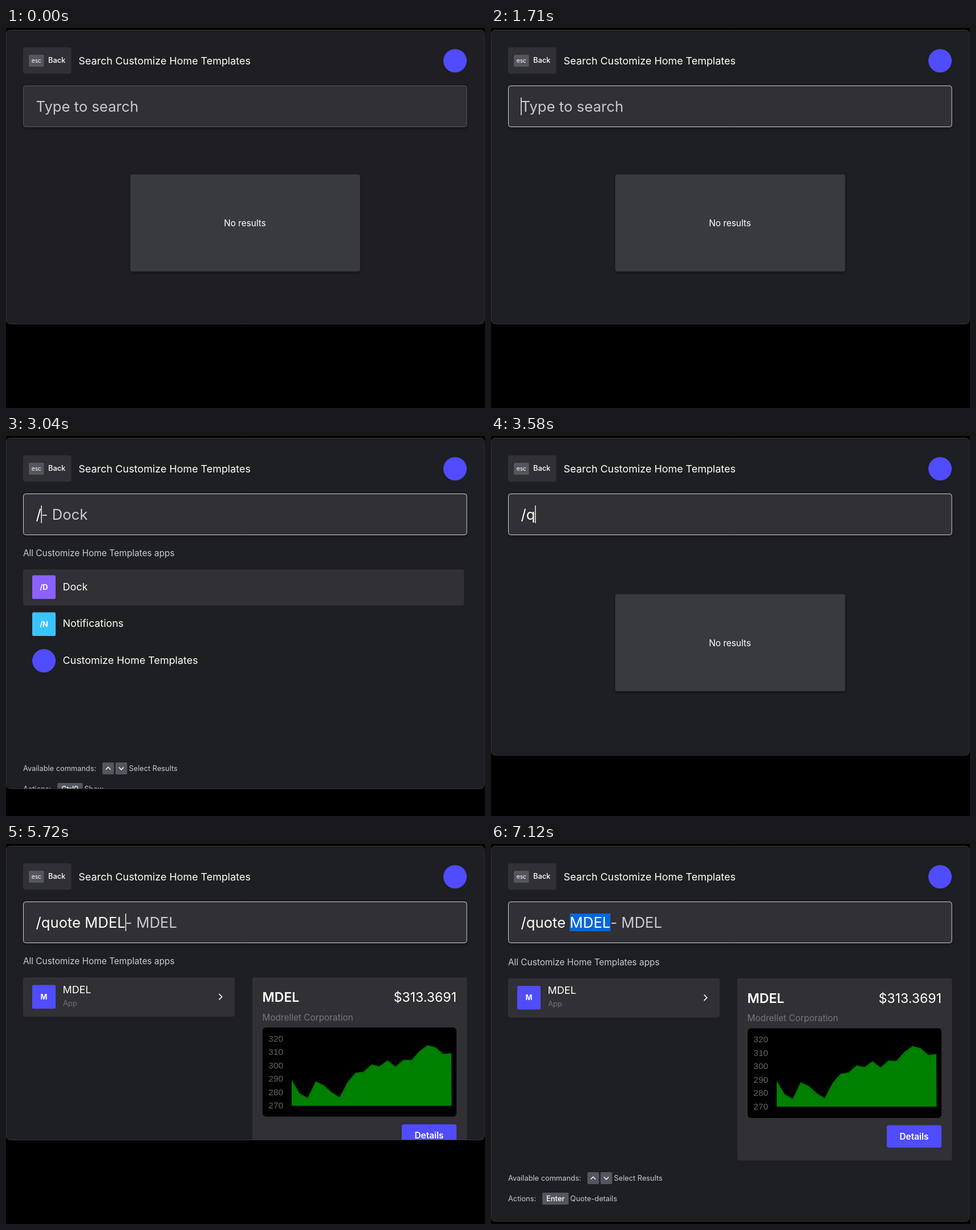
An HTML page with a canvas that plays this animation: 840x667 px, repeating every 8000 ms.

```html
<!DOCTYPE html>
<html lang="en">
<head>
<meta charset="utf-8">
<title>Template search</title>
<style>
html, body { margin: 0; width: 100%; height: 100%; overflow: hidden; background: #000; }
canvas { display: block; width: 840px; height: 667px; }
</style>
</head>
<body>
<canvas id="stage" width="840" height="667"></canvas>
<script>
const ctx = document.getElementById('stage').getContext('2d');
const LOOP = 8000;
const SMALL = 520, TALL = 663;
const TICKER = 'MDEL';
const COMPANY = 'Modrellet Corporation';
const SIZE = { tiny: 10.24, small: 12.8, body: 15.36, item: 17.92, price: 23.04, query: 25.6 };
const C = {
  bg: '#1e1f23', panel: '#303035', card: '#393a3f', key: '#53565f', brand: '#504cff',
  text: '#ffffff', soft: '#c9cbd2', dim: '#75767b', select: '#0866d6'
};

// Each entry holds from its time until the next one.
const TYPED = [[0, ''], [2900, '/'], [3440, '/q'], [3650, '/qu'], [3920, '/quo'], [4000, '/quot'],
  [4270, '/quote'], [4530, '/quote '],
  ...[4930, 5130, 5390, 5650].map((t, i) => [t, '/quote ' + TICKER.slice(0, i + 1)])];
const HEIGHT = [[0, SMALL], [3040, 619.5], [3110, TALL], [3580, 561], [3650, 525], [3720, SMALL],
  [5790, 619.5], [5860, 656], [5930, TALL]];
const VIEW = [[0, 'empty'], [2970, 'apps'], [3510, 'empty'], [5720, 'quote']];
const CARET = [[0, false], [1710, true], [2240, false], [2770, true], [6190, false], [6720, true], [7120, false]];
const PRICES = [46, 22, 14, 43, 36.5, 24, 15, 42, 58, 60, 72.5, 69.5, 80, 69, 81, 80.5, 96, 106.5, 103, 91, 92.5];

const at = (track, t) => track.filter(step => step[0] <= t).pop()[1];

function setFont(size, weight = 400, family = 'Inter') {
  ctx.font = `${weight} ${size}px ${family}, sans-serif`;
}

function label(str, x, y, size, color = C.text, weight = 400, align = 'left', family) {
  setFont(size, weight, family);
  ctx.textAlign = align;
  ctx.fillStyle = color;
  ctx.fillText(str, x, y);
}

function box(x, y, w, h, r, fill, stroke) {
  ctx.beginPath();
  ctx.roundRect(x, y, w, h, r);
  if (fill) {
    ctx.fillStyle = fill;
    ctx.fill();
  }
  if (stroke) {
    ctx.strokeStyle = stroke;
    ctx.lineWidth = 1;
    ctx.stroke();
  }
}

function raised(...args) {
  ctx.save();
  ctx.shadowColor = 'rgba(0,0,0,0.35)';
  ctx.shadowBlur = 5;
  ctx.shadowOffsetY = 3;
  box(...args);
  ctx.restore();
}

function line(points, width) {
  ctx.beginPath();
  points.forEach(p => ctx.lineTo(...p));
  ctx.strokeStyle = C.text;
  ctx.lineWidth = width;
  ctx.stroke();
}

function dot(x, y) {
  ctx.beginPath();
  ctx.arc(x, y, 20.5, 0, Math.PI * 2);
  ctx.fillStyle = C.brand;
  ctx.fill();
}

function badge(str, y, color) {
  box(46, y, 41, 41.5, 2.5, color);
  label(str, 66.5, y + 25.2, SIZE.small, C.text, 700, 'center');
}

function header() {
  box(30, 34, 84.5, 46.5, 4, C.panel);
  box(40, 47, 26.5, 21, 2, C.key);
  label('esc', 53.3, 61, SIZE.tiny, C.text, 400, 'center');
  label('Back', 74, 61.3, SIZE.small, C.text, 500);
  label('Search Customize Home Templates', 127.3, 64, SIZE.item);
  dot(787.5, 57.5);
}

function searchBar(t, typed, view) {
  const focused = t >= 1710, left = 52.5, base = 147;
  raised(30.5, 101.5, 777.5, 72, 4, C.panel);
  box(30.5, 101.5, 777.5, 72, 4, null, focused ? '#cfd0d4' : '#55565b');
  setFont(SIZE.query);
  const end = left + ctx.measureText(typed).width;
  if (t >= 7120) {
    const start = left + ctx.measureText('/quote ').width;
    ctx.fillStyle = C.select;
    ctx.fillRect(start, 122, end - start, 31);
  }
  if (!typed) label('Type to search', left, base, SIZE.query, C.soft);
  label(typed, left, base, SIZE.query);
  if (view !== 'empty') label(view === 'apps' ? '- Dock' : '- ' + TICKER, end, base, SIZE.query, C.soft);
  if (at(CARET, t)) {
    ctx.fillStyle = C.text;
    ctx.fillRect(end - 0.3, 122, 1.4, 31);
  }
}

function emptyView(h) {
  const y = 257 + (h - SMALL) / 2;
  raised(218, y, 403, 170.5, 4, C.card);
  label('No results', 419, y + 91, SIZE.body, C.text, 400, 'center');
}

function appsView(d) {
  box(30, 234 + d, 773, 63.5, 4, C.panel);
  badge('/D', 244.5 + d, '#8c61ff');
  badge('/N', 309.5 + d, '#38c3ff');
  dot(66.5, 394.5 + d);
  ['Dock', 'Notifications', 'Customize Home Templates'].forEach((name, i) =>
    label(name, 99.5, 270.5 + d + i * 64.5, SIZE.item));
}

function chart(d) {
  box(450, 322 + d, 340, 156.5 + d * 0.6, 6, '#000');
  for (let i = 0; i < 6; i++) {
    label(320 - i * 10, 486, 346.5 + d + i * 23.5, SIZE.body, '#666', 400, 'right', 'Liberation Sans');
  }
  const floor = 459.5 + d, x0 = 501, step = 14;
  ctx.beginPath();
  ctx.moveTo(x0, floor);
  PRICES.forEach((p, i) => ctx.lineTo(x0 + i * step, floor - p));
  ctx.lineTo(x0 + 20 * step + 0.5, floor);
  ctx.closePath();
  ctx.fillStyle = '#008000';
  ctx.fill();
  ctx.beginPath();
  PRICES.forEach((p, i) => ctx.lineTo(x0 + i * step, floor - p));
  ctx.strokeStyle = 'rgba(0,0,0,0.1)';
  ctx.lineWidth = 3.8;
  ctx.stroke();
}

function quoteView(d) {
  box(30, 234 + d, 371, 69, 4, C.panel);
  badge('M', 247.5 + d, C.brand);
  label(TICKER, 99.5, 261.5 + d, SIZE.item);
  label('App', 100, 283.5 + d, SIZE.small, C.dim);
  line([[373.5, 263 + d], [378.7, 268.2 + d], [373.5, 273.4 + d]], 1.6);

  box(432, 234 + d, 376.5, 320, 4, C.panel);
  label(TICKER, 449.5, 277 + d, SIZE.price, C.text, 600);
  label('$313.3691', 790, 277 + d, SIZE.price, C.text, 400, 'right');
  label(COMPANY, 449.5, 309.5 + d, SIZE.body, C.dim);
  chart(d);
  box(694, 492 + d, 96, 39.5, 4, C.brand);
  label('Details', 742, 517 + d, SIZE.body, C.text, 600, 'center');
}

function footer(d, key, action) {
  label('Available commands:', 30, 588 + d, SIZE.small, C.soft);
  [[179, -1], [202, 1]].forEach(([x, dir]) => {
    const y = 583.5 + d;
    box(x - 10, 573 + d, 20.5, 21, 2, C.key);
    line([[x - 4, y - 2 * dir], [x + 0.2, y + 2.2 * dir], [x + 4.4, y - 2 * dir]], 1.4);
  });
  label('Select Results', 215.5, 588 + d, SIZE.small, C.soft);

  label('Actions:', 30, 624 + d, SIZE.small, C.soft);
  setFont(SIZE.small, 500);
  const w = ctx.measureText(key).width + 14;
  box(90, 609 + d, w, 21, 2, C.key);
  label(key, 97, 624 + d, SIZE.small, C.text, 500);
  label(action, 93 + w, 624 + d, SIZE.small, C.soft);
}

function draw(t) {
  ctx.fillStyle = '#000';
  ctx.fillRect(0, 0, 840, 667);
  if (t >= 130 && t < 1710) return;

  const h = at(HEIGHT, t), view = at(VIEW, t);
  const d = h === TALL ? 1.5 : 0;
  ctx.save();
  box(0, 3, 839.5, h - 3, 8, t < 130 ? '#1f1e23' : C.bg);
  ctx.clip();
  header();
  searchBar(t, at(TYPED, t), view);
  if (view === 'empty') {
    emptyView(h);
  } else {
    label('All Customize Home Templates apps', 30, 211 + d, SIZE.body, C.soft);
    if (view === 'apps') {
      appsView(d);
      footer(2 * d, 'Ctrl0', 'Show');
    } else {
      quoteView(d);
      footer(2 * d, 'Enter', 'Quote-details');
    }
  }
  ctx.restore();
  box(0.5, 3.5, 838.5, h - 4, 8, null, '#303136');
}

const begin = performance.now();
function tick() {
  draw((performance.now() - begin) % LOOP);
  requestAnimationFrame(tick);
}
tick();
</script>
</body>
</html>
```
